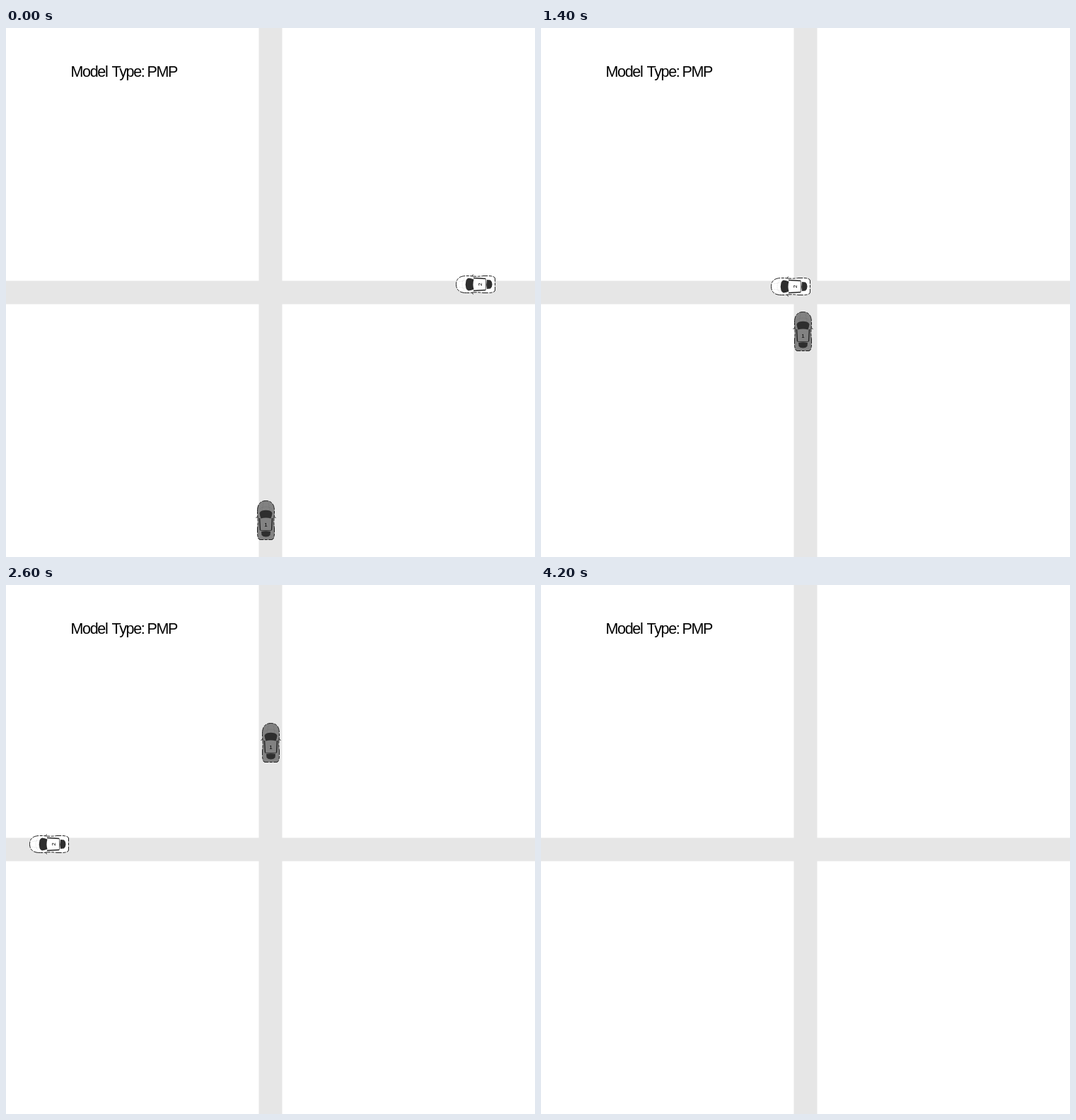
An HTML page for the animation above (5.8 s loop, 748 px wide and 748 px high).

```html
<!DOCTYPE html>
<html lang="en">
<head>
<meta charset="utf-8">
<title>Intersection</title>
<style>
  html, body { margin: 0; width: 100%; height: 100%; overflow: hidden; background: #fff; }
  svg { display: block; width: 100%; height: 100%; }
  text { font-family: "Liberation Sans", Arial, sans-serif; }
  .title { font-size: 21.5px; letter-spacing: -1.35px; }
  .number { font-size: 8px; text-anchor: middle; }
  .glass { fill: #2e2e2e; }
  .line { fill: none; stroke: #222; }
</style>
</head>
<body>
<svg viewBox="0 0 748 748">
  <defs>
    <!-- Car seen from above, 29 by 56, facing up -->
    <g id="car">
      <path stroke="#1c1c1c" stroke-dasharray="9 1.5 4 1.5" d="M2.5 15C2.5 5 7 .5 14.5 .5S26.5 5 26.5 15V20Q25 29 26.5 39V46Q26.5 51 25 54Q24.5 55.5 22 55.5H7Q4.5 55.5 4 54Q2.5 51 2.5 46V39Q4 29 2.5 20Z"/>
      <path class="line" d="M.5 24.5 3 23M28.5 24.5 26 23"/>
      <path class="line" stroke-width=".5" stroke-opacity=".35" stroke-dasharray="1 1.5" d="M9 13 11 3M20 13 18 3M6 12Q14.5 6 23 12"/>
      <path class="glass" d="M5.5 18Q6 15.5 9 14.5Q14.5 13 20 14.5Q23 15.5 23.5 18Q23 22 21.5 25.5Q14.5 23.5 7.5 25.5Q6 22 5.5 18Z"/>
      <path class="line" stroke-width="1.4" d="M5.5 25 6.5 42M23.5 25 22.5 42"/>
      <path class="line" stroke-width=".7" d="M6.5 42.5H22.5"/>
      <path class="glass" d="M8 44Q14.5 42.5 21 44L20.5 49Q18.5 51.5 14.5 51.5T8.5 49Z"/>
    </g>
  </defs>
  <path fill="#e6e6e6" d="M357.5 0H390.5V357.5H748V390.5H390.5V748H357.5V390.5H0V357.5H357.5Z"/>
  <text class="title" y="69"><tspan x="91.5">Model </tspan><tspan x="149.6">Type: </tspan><tspan x="199.4">PMP</tspan></text>
  <g id="gray"><use href="#car" fill="#828282"/><text class="number" x="14.5" y="36.5">1</text></g>
  <g id="white"><use href="#car" fill="#fff"/><text class="number" x="14.5" y="36.5">2</text></g>
</svg>
<script>
const LOOP = 5800, STEP = 200;
const gray = document.getElementById("gray");
const white = document.getElementById("white");

// Waypoints: [step, position]
const grayX = [[0, 353.5], [5, 355.8], [20, 364.2]];
const grayY = [[0, 668], [2, 586], [5, 472], [7, 401], [20, -45], [21, -79]];
const whiteX = [[0, 636], [1, 598], [3, 514], [4, 470], [5, 423], [7, 325],
                [10, 177], [11, 128], [13, 33], [15, -62]];
const whiteY = [[0, 349.2], [9, 353.1]];

function along(points, step) {
  const i = points.findIndex(p => p[0] > step);
  if (i < 0) return points[points.length - 1][1];
  const [s0, v0] = points[i - 1], [s1, v1] = points[i];
  return v0 + (v1 - v0) * (step - s0) / (s1 - s0);
}

const snap = v => Math.floor(v + 0.45);

function draw(now) {
  const step = Math.floor(now % LOOP / STEP);
  const gx = Math.floor(along(grayX, step)), gy = snap(along(grayY, step));
  const wx = snap(along(whiteX, step)), wy = Math.floor(along(whiteY, step));
  gray.setAttribute("transform", `translate(${gx} ${gy})`);
  white.setAttribute("transform", `translate(${wx} ${wy + 28}) rotate(-90)`);
  requestAnimationFrame(draw);
}
draw(0);
</script>
</body>
</html>
```
